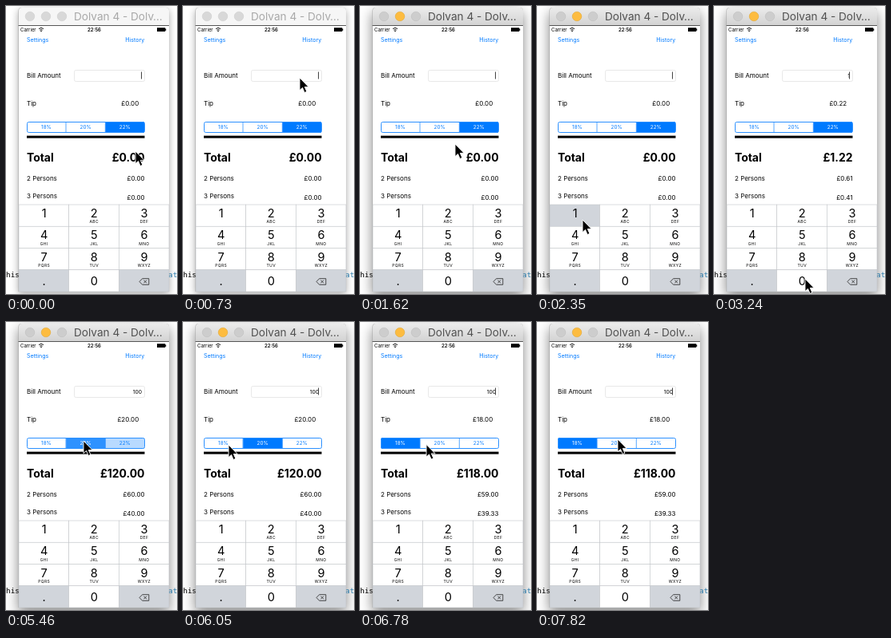
An HTML page for the animation above (8000 ms loop, 214 by 361 pixels).

```html
<!DOCTYPE html>
<html>
<head>
<meta charset="utf-8">
<style>
html, body { margin: 0; width: 100%; height: 100%; overflow: hidden; background: #fff; }
svg { display: block; width: 100vw; height: 100vh; font: 8px Inter, Roboto, sans-serif; }
.blue { fill: #007aff; font-size: 7.1px; }
.mid { text-anchor: middle; }
.end { text-anchor: end; }
.bold { font-weight: 700; font-size: 13.9px; }
.mono { font: 9.4px "DejaVu Sans Mono", monospace; }
.digit { font-size: 14.5px; }
.letters { font-size: 5px; letter-spacing: .35px; }
#frame { filter: drop-shadow(0 6px 8px rgba(0,0,0,.48)); }
.idle #frame { filter: drop-shadow(0 3px 5px rgba(0,0,0,.35)); }
#bar { fill: url(#metal); }
.idle #bar { fill: #f6f6f6; }
#title { font-size: 13.6px; fill: #505050; }
.idle #title { fill: #a8a8a8; }
.light { fill: #cdcdcd; stroke: #b8b8b8; stroke-width: .5px; }
.yellow { fill: #fdbc40; stroke: #dfa023; }
.idle .light { fill: #d8d8d8; stroke: #c8c8c8; }
</style>
</head>
<body>
<svg id="stage" viewBox="0 0 214 361">
  <defs>
    <linearGradient id="metal" x2="0" y2="1">
      <stop stop-color="#ebebeb"/><stop offset="1" stop-color="#d3d3d3"/>
    </linearGradient>
    <clipPath id="pill"><rect x="26" y="145" width="147.5" height="14" rx="2"/></clipPath>
  </defs>
  <rect width="214" height="361" fill="#fff"/>
  <path id="frame" d="M15.5 358V6q0-4 4-4H200q4 0 4 4V358Z" fill="#aaa"/>
  <text class="mono" x="0" y="340">his</text>
  <text class="mono" x="203" y="340" fill="#2577a8">at</text>
  <path id="bar" d="M16 24V6q0-4 4-4H200q4 0 4 4V24Z"/>
  <circle class="light" cx="30" cy="13" r="5.8"/>
  <circle class="light yellow" cx="50" cy="13" r="5.8"/>
  <circle class="light" cx="70" cy="13" r="5.8"/>
  <text id="title" x="85" y="18">Dolvan 4 - Dolv…</text>
  <rect x="16" y="24" width="188" height="334" fill="#fff"/>
  <path d="M15.5 24.5H204" stroke="#555"/>

  <text x="18" y="32" font-size="6">Carrier</text>
  <path d="M41 28.6q3-2.6 6 0M42.4 30.2q1.6-1.4 3.2 0" fill="none" stroke="#000" stroke-width=".9"/>
  <circle cx="44" cy="31.5" r=".8"/>
  <path d="M189 27.3h10.3v1.3h1v2.2h-1v1.2h-10.3Z"/>
  <text class="mid" x="110.5" y="32" font-size="6" font-weight="600">22:56</text>
  <text class="blue" x="26" y="45">Settings</text>
  <text class="blue end" x="173.3" y="45">History</text>

  <text x="26" y="90">Bill Amount</text>
  <rect x="85.5" y="80.5" width="88" height="14" rx="2" fill="#fff" stroke="#e2e2e2" stroke-width=".8"/>
  <text id="bill" class="end" x="170" y="90" font-size="6.7"></text>
  <path id="caret" d="M169.5 82.5V91.5" stroke="#444"/>
  <text x="26" y="125">Tip</text>
  <text id="tip" class="end" x="166.2" y="125"></text>
  <g id="tabs" clip-path="url(#pill)"></g>
  <g fill="none" stroke="#2b90ff">
    <path d="M75 145V159M124.3 145V159" stroke-width=".8"/>
    <rect x="26.5" y="145.5" width="147" height="13" rx="2"/>
  </g>
  <rect x="26" y="162.6" width="147.5" height="3"/>
  <text class="bold" x="26" y="194.5">Total</text>
  <text id="total" class="end bold" x="173.5" y="194.5"></text>
  <text x="26" y="219">2 Persons</text>
  <text id="two" class="end" x="173.5" y="219"></text>
  <text x="26" y="241.4">3 Persons</text>
  <text id="three" class="end" x="173.5" y="243.3"></text>

  <g id="keys"></g>
  <g fill="none" stroke="#222" stroke-width=".8">
    <path d="M167 345.5l3.6-3.8h8.2v7.6h-8.2Z"/>
    <path d="M172.4 343.7l3.6 3.6m0-3.6l-3.6 3.6"/>
  </g>
  <path id="mouse" d="M0 0V15.6L3.5 12.4L6.1 18.5L8.9 17.3L6.3 11.4H11.1Z" stroke="#fff" stroke-width=".9"/>
</svg>
<script>
const $ = id => document.getElementById(id);
const LOOP = 8000, STEP = 147.5;
const rates = [18, 20, 22];

$('tabs').innerHTML = rates.map((r, i) => {
  const x = 26 + i * 49.2;
  return `<rect class="tab" x="${x}" y="145" width="49.2" height="14" fill="#007aff"/>
    <text class="label mid" x="${x + 24.4}" y="154.3" font-size="6.3">${r}%</text>`;
}).join('');

const caps = ['1', '2ABC', '3DEF', '4GHI', '5JKL', '6MNO', '7PQRS', '8TUV', '9WXYZ', '.', '0', ''];
$('keys').innerHTML = caps.map((cap, i) => {
  const col = i % 3, row = i / 3 | 0, x = 16 + col * 62.67, y = 249 + row * 27.25;
  const fill = row == 3 && col != 1 ? '#d1d5db' : '#fff';
  const cx = x + 31.6, base = row == 3 ? y + 19 : y + 16;
  return `<rect class="key" x="${x}" y="${y}" width="62.67" height="27.25"
      fill="${fill}" stroke="#c4c6ca" stroke-width=".6"/>
    <text class="digit mid" x="${cx}" y="${base}">${cap.slice(0, 1)}</text>
    <text class="letters mid" x="${cx}" y="${y + 23.3}">${cap.slice(1)}</text>`;
}).join('');

const tabs = document.querySelectorAll('.tab');
const labels = document.querySelectorAll('.label');
const firstKey = document.querySelector('.key');

// [step, x, y] of the pointer tip
const path = [
  [0, 162, 182], [3, 154, 62], [5, 146, 90], [6, 146, 90], [7, 126, 165], [10, 126, 165],
  [11, 119, 173], [15, 57, 268], [17, 57, 268], [18, 65, 269], [21, 114, 342], [30, 114, 342],
  [34, 40, 175], [36, 97, 149], [37, 97, 149], [41, 57, 154], [45, 57, 154], [46, 83, 153.5],
  [47, 100, 150], [48, 100, 150], [50, 101, 147], [55, 101, 147]
];
const bills = [[0, 0], [17, 1], [26, 10], [30, 100]];
const picks = [[0, 2], [37, 1], [43, 0]];
const caretOff = [[2, 3], [14, 15], [23, 30], [37, 37], [43, 44], [50, 51]];

const latest = (list, n) => list.filter(e => e[0] <= n).pop();
const pounds = v => '£' + v.toFixed(2);

function pointer(n) {
  const a = latest(path, n), b = path[path.indexOf(a) + 1] || a;
  const k = a == b ? 0 : (n - a[0]) / (b[0] - a[0]);
  return [1, 2].map(i => a[i] + (b[i] - a[i]) * k);
}

function draw(t) {
  const n = Math.floor((t + 20) / STEP);
  $('stage').classList.toggle('idle', n < 7);
  $('mouse').setAttribute('transform', `translate(${pointer(n)})`);

  const bill = latest(bills, n)[1];
  const [since, pick] = latest(picks, n);
  const fading = since > 0 && n == since;
  const tip = bill * rates[pick] / 100, total = bill + tip;
  $('bill').textContent = bill || '';
  $('tip').textContent = pounds(tip);
  $('total').textContent = pounds(total);
  $('two').textContent = pounds(total / 2);
  $('three').textContent = pounds(total / 3);

  tabs.forEach((tab, i) => {
    const on = i == pick ? (fading ? .82 : 1) : (fading && i == pick + 1 ? .28 : 0);
    tab.setAttribute('opacity', on);
    labels[i].setAttribute('fill', on > .5 ? '#fff' : '#007aff');
  });
  firstKey.setAttribute('fill', n == 15 || n == 16 ? '#d1d5db' : '#fff');
  $('caret').setAttribute('opacity', caretOff.some(([a, b]) => n >= a && n <= b) ? 0 : 1);
}

const start = performance.now();
function tick() {
  draw((performance.now() - start) % LOOP);
  requestAnimationFrame(tick);
}
tick();
</script>
</body>
</html>
```
